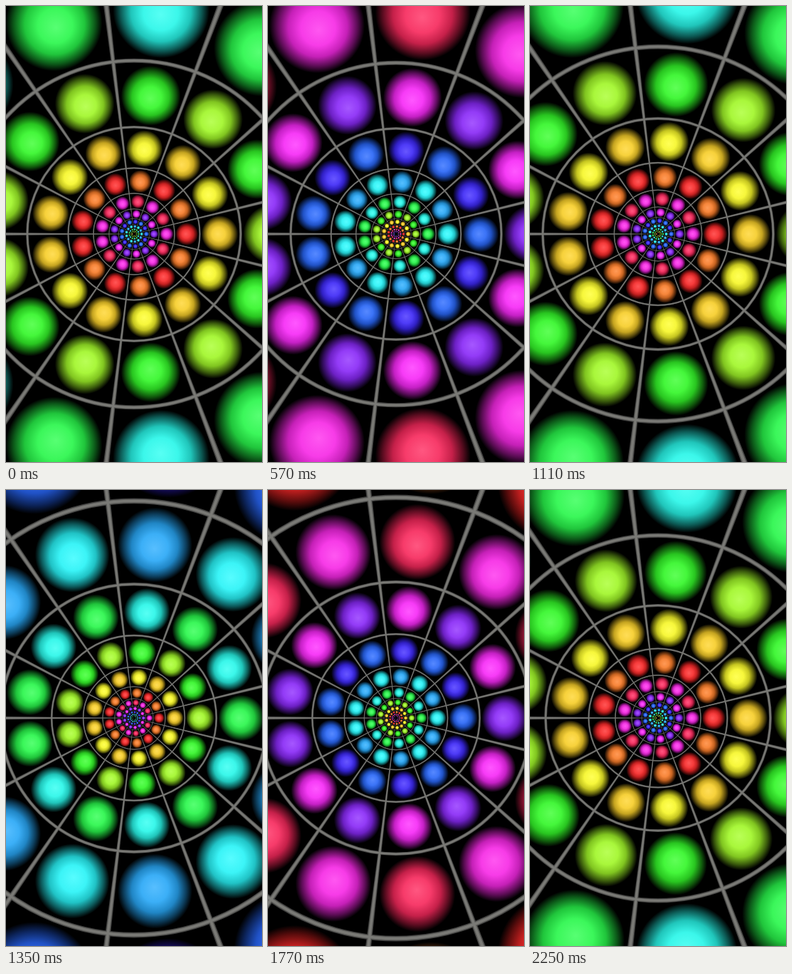
These frames come from a looping animation (360 px wide and 640 px high, 2280 ms). An HTML page with a canvas:

```html
<!DOCTYPE html>
<html lang="en">
<head>
<meta charset="utf-8">
<title>Log-polar tunnel</title>
<style>
  html, body { margin: 0; width: 100%; height: 100%; overflow: hidden; background: #000; }
  canvas { display: block; }
</style>
</head>
<body>
<canvas id="stage" width="360" height="640"></canvas>
<script>
const ctx = document.getElementById('stage').getContext('2d');
const TAU = Math.PI * 2;
const SECTORS = 13;
const CELL = TAU / SECTORS;   // cells are square in (log r, angle)
const TICK = 30, LOOP = 2280;
const START = 8.868;          // ring position at time 0, in cells
const SPEED = 0.2119;         // cells travelled inwards per tick
const BALL = 0.45 * CELL;

// Colours repeat every 8 rings: even sector, odd sector.
const HUES = [0, 24, 48, 60, 85, 117, 130, 176, 181, 203, 222, 246, 268, 300, 305, 345];
// Soft grid line: [relative width, colour]
const STROKES = [[0.025, '#3c3c3b'], [0.018, '#62625f'], [0.011, '#7a7a76']];

function drawSpokes(width) {
  for (let k = 0; k < SECTORS; k++) {
    const a = Math.PI + k * CELL;
    ctx.beginPath();
    ctx.moveTo(0, 0);
    ctx.arc(0, 0, 400, a - width / 2, a + width / 2);
    ctx.fill();
  }
}

function drawRing(r, width) {
  ctx.lineWidth = r * width;
  ctx.beginPath();
  ctx.arc(0, 0, r, 0, TAU);
  ctx.stroke();
}

function ballFill(r, cx, radius, hue) {
  const g = ctx.createRadialGradient(r, 0, 0, cx, 0, radius);
  g.addColorStop(0, `hsl(${hue} 100% 67%)`);
  g.addColorStop(0.36, `hsl(${hue} 92% 60%)`);
  g.addColorStop(0.62, `hsl(${hue} 72% 45%)`);
  g.addColorStop(0.84, `hsl(${hue} 76% 20%)`);
  g.addColorStop(1, '#000');
  return g;
}

function drawBalls(r, ring) {
  const cx = r * Math.cosh(BALL), radius = r * Math.sinh(BALL);
  const row = 2 * (((ring % 8) + 8) % 8);
  const fills = [0, 1].map(odd => ballFill(r, cx, radius, HUES[row + odd]));
  for (let k = -6; k <= 6; k++) {
    ctx.save();
    ctx.rotate(k * CELL);
    ctx.fillStyle = fills[Math.abs(k) % 2];
    ctx.beginPath();
    ctx.arc(cx, 0, radius, 0, TAU);
    ctx.fill();
    ctx.restore();
  }
}

function draw(time) {
  const shift = START - SPEED * Math.floor((time % LOOP) / TICK);
  const first = Math.ceil(1 - shift), last = Math.floor(13.3 - shift);
  const radius = n => Math.exp((n + shift) * CELL);

  ctx.setTransform(1, 0, 0, 1, 0, 0);
  ctx.fillStyle = '#000';
  ctx.fillRect(0, 0, 360, 640);
  ctx.translate(180, 320);

  for (let n = first; n <= last; n++) drawBalls(radius(n), n);
  for (const [width, color] of STROKES) {
    ctx.fillStyle = ctx.strokeStyle = color;
    drawSpokes(width);
    for (let n = first; n <= last; n++) drawRing(radius(n + 0.5), width);
  }
}

let start;
function frame(now) {
  start ??= now;
  draw(now - start);
  requestAnimationFrame(frame);
}
draw(0);
requestAnimationFrame(frame);
</script>
</body>
</html>
```
